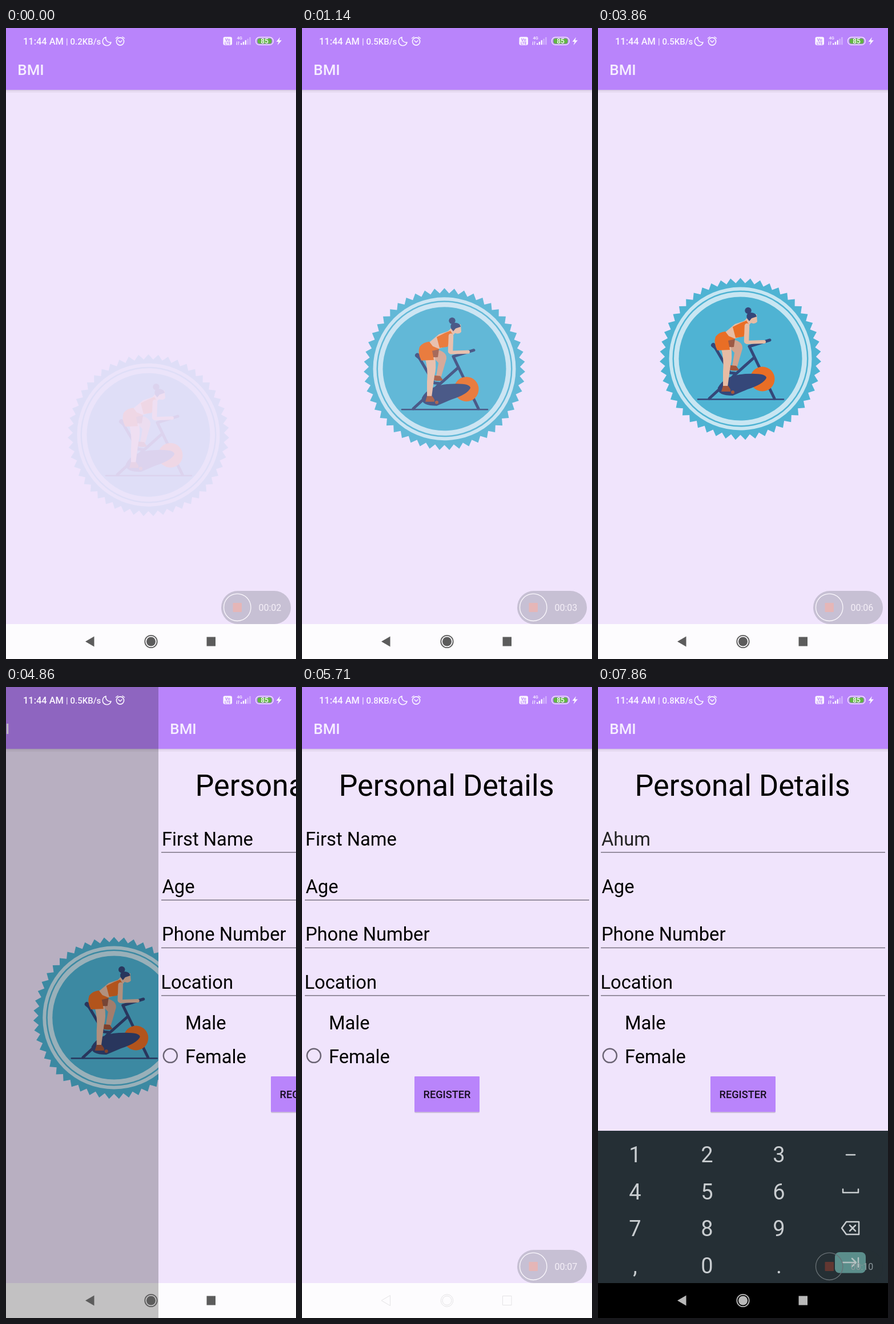
An HTML page for the animation above (8000 ms loop, 508x1102 px).

```html
<!DOCTYPE html>
<html lang="en">
<head>
<meta charset="utf-8">
<title>BMI</title>
<style>
html, body { margin: 0; width: 100%; height: 100%; overflow: hidden; background: #f0e4fc }
svg { display: block; width: 100vw; height: 100vh; font-family: Roboto, sans-serif }
</style>
</head>
<body>
<svg id="stage" viewBox="0 0 508 1102" preserveAspectRatio="none"></svg>
<script>
const LOOP = 8000, FPS = 7, NAME = 'Ahum';
const PURPLE = '#b984fb', PAPER = '#f0e4fc', NAVY = '#354779', ORANGE = '#e96e25',
  SKIN = '#e7bca4', BLUE = '#4fb3d3', PALE = '#c8e6f2', KEYS = '#252f35', KEY_TEXT = '#c9cdd0';

const escapeText = s => s.replace(/&/g, '&amp;').replace(/</g, '&lt;');
const text = (x, y, size, s, fill = '#000', extra = '') =>
  `<text x="${x}" y="${y}" font-size="${size}" fill="${fill}" ${extra}>${escapeText(s)}</text>`;
const mid = (x, y, size, s, fill, extra = '') => text(x, y, size, s, fill, 'text-anchor="middle" ' + extra);
const rect = (x, y, w, h, fill, r = 0, extra = '') =>
  `<rect x="${x}" y="${y}" width="${w}" height="${h}" rx="${r}" fill="${fill}" ${extra}/>`;
const circle = (x, y, r, fill, extra = '') => `<circle cx="${x}" cy="${y}" r="${r}" fill="${fill}" ${extra}/>`;
const shape = (d, fill) => `<path d="${d}" fill="${fill}"/>`;
const line = (d, color, width, cap = 'round') =>
  `<path d="${d}" fill="none" stroke="${color}" stroke-width="${width}" stroke-linecap="${cap}" stroke-linejoin="round"/>`;
const group = (x, y, body, extra = '') => `<g transform="translate(${x} ${y})" ${extra}>${body}</g>`;
const MEDIUM = 'font-weight="500"';

function makeBadge() {
  const teeth = 51, cx = 249.5, cy = 578, points = [];
  for (let i = 0; i < teeth * 2; i++) {
    const a = i * Math.PI / teeth, r = i % 2 ? 132.5 : 141.5;
    points.push((cx + r * Math.sin(a)).toFixed(1) + ',' + (cy - r * Math.cos(a)).toFixed(1));
  }
  const rings = [[125, PALE], [119, BLUE], [116.5, PALE], [108, BLUE]];
  return `<polygon points="${points.join(' ')}" fill="${BLUE}"/>` +
    rings.map(([r, c]) => circle(cx, cy - 0.5, r, c)).join('') +
    // bike
    line('M175 648.5H325', NAVY, 2.6) +
    line('M195 647L220 624M265 556L309 647M204 556L231 602L240 603M273 576L236 609M265 556L301 545', NAVY, 5) +
    line('M202 554L207 558', NAVY, 8) +
    circle(288, 613, 21.5, ORANGE) +
    // far leg
    shape('M228 556L240 545Q254 549 253 560L244 591H235L239 567Z', '#d3a38d') +
    shape('M226 544L240 543L238 557L228 558Z', '#9c5a45') +
    shape('M232 589L242 590L247 597Q240 600 230 597Z', '#a4553a') +
    shape('M210 628Q222 606 258 604Q295 602 295 611Q290 622 262 631L236 642Q208 642 210 628Z', NAVY) +
    // head and torso
    circle(263, 493.5, 5.7, NAVY) +
    shape('M255 513L265 502L278 500L279 513Q275 518 268 515L262 522Z', SKIN) +
    shape('M261 507Q258 497 269 497Q277 498 278 504L269 507L265 512Z', NAVY) +
    shape('M222 532L240 517L258 511L265 518L257 537L238 543L228 542Z', SKIN) +
    shape('M236 522L250 515L260 511L264 517L255 539L241 541Z', ORANGE) +
    // near leg
    shape('M216 560L233 557Q236 576 232 590L227 627H219L219 600Q221 580 216 560Z', SKIN) +
    shape('M206 539Q212 531 223 530L229 538L241 543L228 546L231 562L209 563Q202 550 206 539Z', ORANGE) +
    shape('M219 625H228L232 631V635H216Z', '#a4553a') + circle(236, 636, 3, '#a4553a') +
    // arm
    line('M261 520L260 547', SKIN, 8.5) + line('M261 549L291 548', SKIN, 6);
}
const badge = makeBadge();

const appBar = rect(0, 0, 508, 1102, PAPER) + rect(0, 108, 508, 2, '#dacde6') +
  rect(0, 110, 508, 3, '#e7dcf2') + rect(0, 0, 508, 108, PURPLE) +
  text(20.3, 82, 25.9, 'BMI', '#f7efff', MEDIUM) + rect(0, 1041, 508, 61, '#fdfcfe');

const splash = p => appBar + group(0, 148 * (1 - p), badge, `opacity="${p}"`);

function form(typed, focus) {
  const fields = [[6, typed || 'First Name'], [6.5, 'Age'], [6, 'Phone Number'], [4.5, 'Location']];
  return appBar + mid(253, 189.5, 52.2, 'Personal Details') +
    fields.map(([x, label], i) => {
      const y = 276.5 + i * 83.4;
      return text(x, y, 32.7, label, i || !typed ? '#000' : '#222') +
        (i === focus ? '' : rect(5, y + 11.5, 498, 1.4, '#736c7b'));
    }).join('') +
    text(47, 598, 32.7, 'Male') + text(47, 656.5, 32.7, 'Female') +
    circle(20.8, 643.8, 12, 'none', 'stroke="#6b6474" stroke-width="2.5"') +
    rect(197, 682, 114, 62, '#cbbdda', 2) + rect(197, 680, 114, 62, PURPLE, 1) +
    mid(254, 718, 18.2, 'REGISTER', '#160d20', MEDIUM);
}

const backspace = (x, y) => group(x, y,
  line('M-15 0L-7 -11H15V11H-7ZM-1 -5L9 5M9 -5L-1 5', KEY_TEXT, 2.5));
const enterKey = (x, y) => group(x, y, rect(0, 0, 54, 36.5, '#69a6a1', 8) +
  line('M14 18H37M30 11L37 18L30 25M41 10V26', '#d5e6e4', 2.5));

// Each row: letters, hints, first key centre, letter baseline
const ROWS = [
  ['QWERTYUIOP', '%\\|=[]<>{}', 26, 826],
  ['ASDFGHJKL', '@#£_&-+()', 52, 889],
  ['ZXCVBNM', '*"\':;!?', 102, 951]
];

function letterKeys(upper, pressed) {
  const label = c => upper ? c : c.toLowerCase();
  let out = rect(0, 722, 508, 380, KEYS), popup = '';
  [...(upper ? '!@#$%^&*()' : '1234567890')].forEach((c, i) =>
    out += mid(27 + i * 50.3, 766, 27, c, '#bfc4c7'));
  for (const [letters, hints, x0, y] of ROWS) [...letters].forEach((c, i) => {
    const x = x0 + i * 50.3;
    out += mid(x, y, 29, label(c), KEY_TEXT) + mid(x + 17, y - 23, 14, hints[i], '#90989d');
    if (label(c) === pressed) popup = rect(x - 24, y - 130, 50, 145, '#3b444a', 4) +
      mid(x + 1, y - 81, 36, pressed, '#fff') + mid(x + 14, y - 65, 17, '…', '#fff');
  });
  const shift = 'M40 927L54 941H47V952H33V941H26Z';
  return out + (upper ? shape(shift, '#a9afb3') : line(shift, '#a9afb3', 2)) + backspace(467, 941) +
    mid(40, 1010, 20, '?123', '#b0b5b8', MEDIUM) + mid(103, 1010, 28, ',', KEY_TEXT) +
    circle(153, 1002, 11.5, 'none', `stroke="${KEY_TEXT}" stroke-width="2.5"`) +
    circle(149, 999, 1.8, KEY_TEXT) + circle(157, 999, 1.8, KEY_TEXT) +
    line('M147 1005Q153 1012 159 1005', KEY_TEXT, 2.3) +
    rect(190, 986, 177, 33, '#3d464c', 3) + mid(404, 1013, 28, '.', KEY_TEXT) +
    enterKey(440, 984.5) + popup;
}

function numberKeys() {
  const rows = ['123', '456', '789', ',0.'];
  return rect(0, 775, 508, 327, KEYS) +
    rows.map((row, r) => [...row].map((c, i) =>
      mid(65 + i * 126, 830 + r * 64.6, 38, c, KEY_TEXT)).join('')).join('') +
    line('M435 817H450', KEY_TEXT, 2.7) + line('M429 877V883H456V877', KEY_TEXT, 2.5) +
    backspace(442, 945) + enterKey(415, 987);
}

function navIcons(mode) {
  const faint = mode === 'faint', color = mode === 'dark' ? '#b9b9b9' : '#5c5c5c';
  const paint = faint ? 'fill="none" stroke="#e4e3e5"' : `fill="${color}"`;
  return `<g ${paint}><path d="M139 1071.5L154.5 1062.5V1080.5Z"/><circle cx="254" cy="1071.5" r="8"/>` +
    `<path d="M351.5 1063.5H367V1079.5H351.5Z"/></g>` +
    circle(254, 1071.5, 10.7, 'none', `stroke="${faint ? '#e4e3e5' : color}" stroke-width="${faint ? 1 : 1.8}"`);
}

function statusBar(speed) {
  const W = '#fbf6ff';
  let out = text(30, 28.5, 16.4, '11:44 AM', W, MEDIUM) + text(105, 28.5, 15, '|', W) +
    text(112.5, 28.5, 15, speed + 'KB/s', W, MEDIUM) +
    line('M175 16A7.5 7.5 0 1 0 184 25A7.5 7.5 0 0 1 175 16Z', W, 1.6) +
    circle(200, 23.5, 6.6, 'none', `stroke="${W}" stroke-width="1.6"`) +
    line('M192.5 18L196 15.5M207.5 18L204 15.5M197 22L200 25L203 22', W, 1.5) +
    rect(380.5, 15.5, 15.5, 14.5, W, 3) + mid(388.2, 22.5, 7.5, 'Vo', PURPLE, 'font-weight="700"') +
    mid(388.2, 29, 6.5, 'LTE', PURPLE, 'font-weight="700"') +
    text(404.5, 20, 7.5, '4G', W, MEDIUM) +
    line('M404.5 24V29M407.5 24V29M403.5 28L404.5 29M408.5 25L407.5 24', W, 1);
  for (let i = 0; i < 5; i++)
    out += rect(411 + i * 3.8, 26.5 - i * 2.6, 2.4, 2.8 + i * 2.6, W, 0.5, i > 2 ? 'opacity=".4"' : '');
  return out + rect(437.7, 16.2, 30.3, 13.2, 'none', 6, `stroke="${W}" stroke-width="1.3"`) +
    rect(440.5, 18.3, 25, 9.2, '#62b445', 4) + mid(453, 27, 12, '85', '#fff', MEDIUM) +
    shape('M480 16L473.5 24H477.5L475.5 30L483 21.5H478.5Z', W);
}

function recorder(seconds, dark) {
  return rect(377, 983, 122, 58, 'rgba(37,47,53,.2)', 29) +
    circle(405.2, 1011.8, 23.7, 'none', `stroke="${dark ? '#687075' : '#fbf8fd'}" stroke-width="1.3"`) +
    rect(397.5, 1004, 15.5, 16, dark ? '#d0442c' : '#e5b6b7', 1, dark ? 'opacity=".36"' : '') +
    text(442.5, 1018, 16, '00:' + String(seconds).padStart(2, '0'), dark ? '#8b979b' : '#f5eff8');
}

const clamp = v => Math.max(0, Math.min(1, v));
const stepTime = k => Math.round(k * 100 / FPS) * 10;

function draw(k) {
  const t = stepTime(k);
  const rise = (1 - Math.cos(Math.PI * clamp((t + 410) / 2000))) / 2;
  const slide = 508 * (1 - clamp((t - 4695) / 600)) ** 2;
  const numeric = t >= 7710, keyboard = t >= 5860;
  const typed = t < 6710 ? '' : NAME.slice(0, Math.max(1, k - 47));
  const pressed = { 45: 'A', 46: 'A', 48: 'h', 49: 'u', 50: 'm' }[k];
  let out = '';
  if (slide > 0) {
    const shown = 1 - slide / 508;
    out += group(-127 * shown, 0, splash(rise)) +
      (shown ? rect(0, 0, 508, 1102, '#000', 0, `opacity="${shown / 2}"`) : '');
  }
  if (slide < 508) out += group(slide, 0, form(typed, numeric ? 1 : t >= 5570 ? 0 : -1));
  if (keyboard) {
    const drop = 319 * (1 - clamp((t - 5780) / 400)) ** 2;
    out += group(0, drop, numeric ? numberKeys() : letterKeys(!typed, pressed)) +
      rect(0, 1041, 508, 61, '#000');
  }
  out += navIcons(keyboard ? 'dark' : t >= 5710 ? 'faint' : 'light') +
    statusBar(t < 1000 ? '0.2' : t < 5000 ? '0.5' : '0.8');
  if (slide === 508 || slide === 0) out += recorder(2 + Math.floor((k + 1) / FPS), t >= 6000);
  return out;
}

const stage = document.getElementById('stage');
let last = -1;
const start = performance.now();
function tick(now) {
  const t = Math.max(0, now - start) % LOOP;
  let k = Math.floor(t * FPS / 1000);
  if (stepTime(k + 1) <= t) k++;
  else if (stepTime(k) > t) k--;
  k %= LOOP * FPS / 1000;
  if (k !== last) stage.innerHTML = draw(last = k);
  requestAnimationFrame(tick);
}
tick(start);
</script>
</body>
</html>
```
